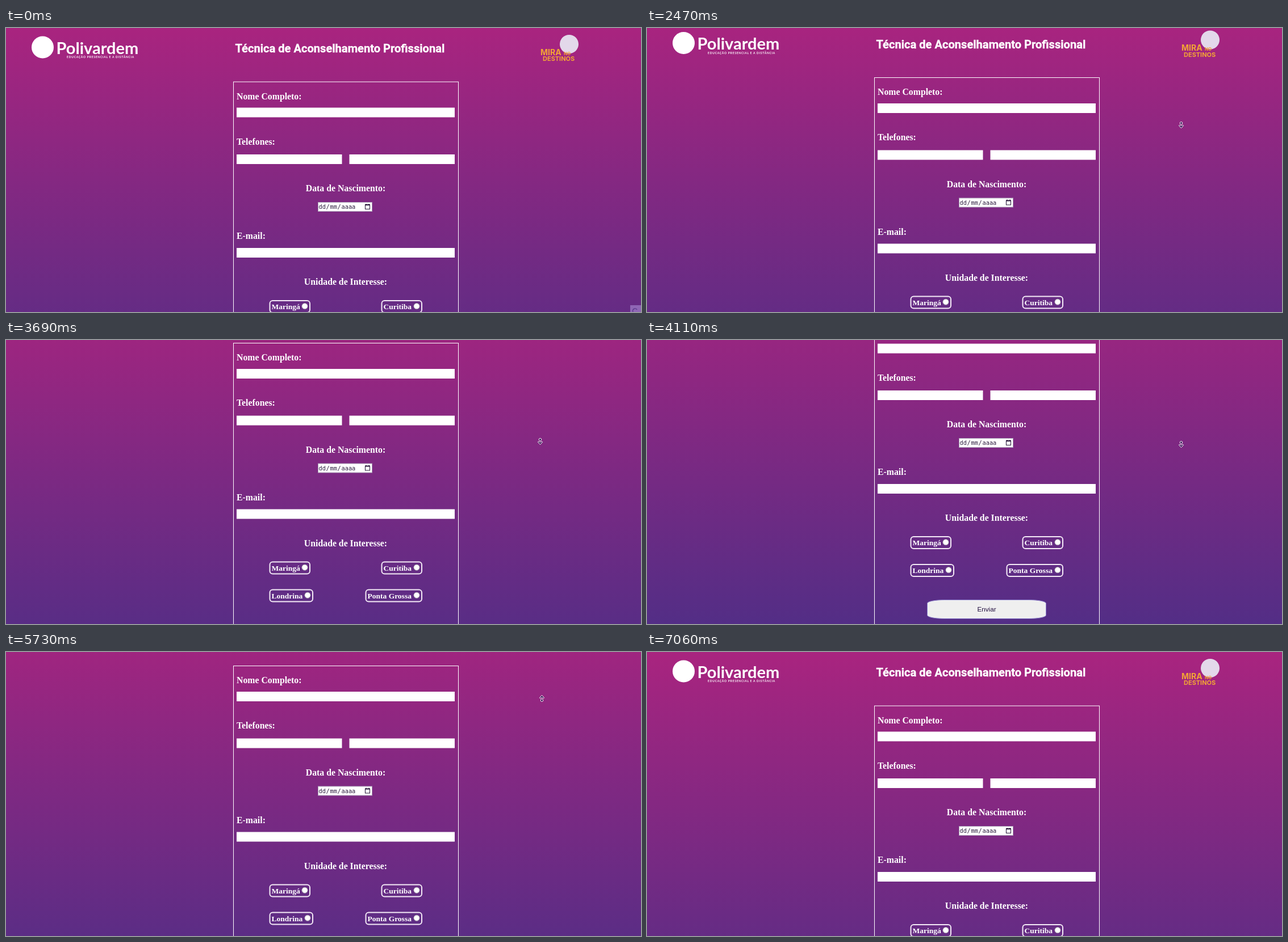
An HTML page that plays this animation: 1118 by 501 pixels, repeating every 7720 ms.

```html
<!DOCTYPE html>
<html lang="pt-BR">
<head>
<meta charset="utf-8">
<title>Formulário</title>
<style>
  html, body { margin: 0; width: 100%; height: 100%; overflow: hidden; background: #502e86; }
  svg { display: block; width: 1118px; height: 501px; }
  .label { font: 700 15.8px "Liberation Serif", "Times New Roman", serif; fill: #fff; }
  .city { font: 700 13.5px "Liberation Serif", "Times New Roman", serif; fill: #fff; }
  .title { font: 700 20.1px Roboto, sans-serif; fill: #fff; stroke: #fff; stroke-width: .35px; }
  .brand { font: 700 29px Lato, sans-serif; fill: #fff; }
  .tagline { font: 700 5px Lato, sans-serif; letter-spacing: .75px; fill: #fff; }
  .badge { font-family: Inter, sans-serif; font-weight: 700; fill: #f2a535; }
  .date { font: 10.3px "DejaVu Sans Mono", monospace; fill: #2b1a3d; }
  .send { font: 11.7px "Liberation Sans", Arial, sans-serif; fill: #231040; }
  .mid { text-anchor: middle; }
</style>
</head>
<body>
<svg viewBox="0 0 1118 501">
  <defs>
    <linearGradient id="sky" x1="0" y1="0" x2="0" y2="1">
      <stop offset="0" stop-color="#a9247f"/>
      <stop offset="1" stop-color="#502e86"/>
    </linearGradient>
    <path id="head" d="M-4 1.4Q-4 .4 -3 .4L0 1.4 3 .4Q4 .4 4 1.4L0 5.6Z"/>
  </defs>

  <g id="page">
    <rect width="1118" height="657" fill="url(#sky)"/>

    <circle cx="64.5" cy="34" r="19.5" fill="#fff"/>
    <text class="brand" x="88.5" y="45.5">Polivardem</text>
    <text class="tagline" x="107" y="53">EDUCAÇÃO PRESENCIAL E A DISTÂNCIA</text>
    <text class="title" x="403.5" y="43">Técnica de Aconselhamento Profissional</text>
    <circle cx="991.5" cy="28.5" r="16.5" fill="#e3d8ea"/>
    <g class="badge">
      <text x="941" y="47.5" font-size="14">MIRA</text>
      <text x="982" y="47.5" font-size="8">NO</text>
      <text x="945" y="58" font-size="11">DESTINOS</text>
    </g>

    <rect x="400.5" y="95" width="396" height="547" fill="none" stroke="#fff"/>
    <g id="form"></g>

    <rect x="549.5" y="307.5" width="95" height="16" fill="#fff" stroke="#a99bb5"/>
    <g class="date">
      <text x="550.5" y="319">dd</text><text x="563.5" y="319">/</text>
      <text x="570.5" y="319">mm</text><text x="583.5" y="319">/</text>
      <text x="590.5" y="319">aaaa</text>
    </g>
    <path d="M632.5 311.5h8v8h-8zM632 312.5h9M634 310v2M639 310v2" fill="none" stroke="#2b1a3d" stroke-width="1.1"/>

    <rect x="493.5" y="592.5" width="209" height="33" rx="30" ry="6" fill="#efefef" stroke="#8f83cf"/>
    <text class="send mid" x="598" y="613">Enviar</text>
    <text class="label" x="-10" y="656" style="fill:#170b26">Fale Conosco:</text>
  </g>

  <g id="corner">
    <rect x="1099" y="489" width="19" height="12" fill="#8f66b5"/>
    <path d="M1111 497a4 4 0 0 0-7 4" fill="none" stroke="#5b3a8c" stroke-width="1.5"/>
  </g>

  <g id="pointer">
    <path id="arrow" d="M.5 .5V13.5L3.5 10.8 5.5 15.5 7.6 14.6 5.6 10H9.8Z" fill="#fff" stroke="#111" stroke-width=".9"/>
    <g id="pan" fill="#3a1658" stroke="#fff" stroke-linejoin="round">
      <circle id="dot" r="2.2"/>
      <use id="down" href="#head"/>
      <use id="up" href="#head" transform="scale(1 -1)"/>
    </g>
  </g>
</svg>

<script>
const LOOP = 7720, MAX_SCROLL = 155;
const $ = id => document.getElementById(id);
const show = (id, on) => { $(id).style.display = on ? "" : "none"; };

const label = (y, s) => `<text class="label" x="406" y="${y}">${s}</text>`;
const heading = (y, s) => `<text class="label mid" x="598" y="${y}">${s}</text>`;
const field = (x, y, w) => `<rect x="${x}" y="${y}" width="${w}" height="17" fill="#fff"/>`;
const city = (x, y, right, s) => `
  <rect x="${x + 1}" y="${y + 1}" width="${right - x - 2}" height="21" rx="5" fill="none" stroke="#f3e9f6" stroke-width="2"/>
  <text class="city" x="${x + 4}" y="${y + 16.3}">${s}</text>
  <circle cx="${right - 10}" cy="${y + 10.7}" r="5.2" fill="#fff" stroke="#8b7a96" stroke-width=".9"/>`;

$("form").innerHTML = [
  label(125.5, "Nome Completo:"), field(406, 140.5, 384),
  label(205.5, "Telefones:"), field(406, 223, 185.5), field(604.5, 223, 185.5),
  heading(288, "Data de Nascimento:"),
  label(372, "E-mail:"), field(406, 388, 384),
  heading(453, "Unidade de Interesse:"),
  city(463.5, 480, 536, "Maringá"), city(660.5, 480, 733, "Curitiba"),
  city(463.5, 529, 541, "Londrina"), city(632.5, 529, 733, "Ponta Grossa")
].join("");

// Pointer path: key points in time
const path = [
  { t: 70, x: 1108, y: 490 },
  { t: 730, x: 951, y: 144 },
  { t: 1390, x: 946, y: 149 },
  { t: 2470, x: 940.5, y: 171 },
  { t: 3140, x: 940.5, y: 172 },
  { t: 4110, x: 940.5, y: 184 },
  { t: 4710, x: 941, y: 181 },
  { t: 5390, x: 943.5, y: 104 },
  { t: 5730, x: 943.5, y: 82 },
  { t: 6330, x: 933, y: 75 },
  { t: 7060, x: 1089, y: 498 }
];

function pointerAt(t) {
  const i = path.findIndex(p => p.t > t);
  if (i < 0) return path[path.length - 1];
  if (i === 0) return path[0];
  const a = path[i - 1], b = path[i], k = (t - a.t) / (b.t - a.t);
  return { x: a.x + (b.x - a.x) * k, y: a.y + (b.y - a.y) * k };
}

// Autoscroll gathers speed: a power curve down, a steeper one back up
function scrollAt(t) {
  const down = 43 * (Math.max(0, t - 2080) / 1060) ** 1.748;
  const up = 84 * (Math.max(0, t - 5330) / 400) ** 1.395;
  const y = Math.max(0, Math.min(MAX_SCROLL, down) - up);
  return Math.round(y * 2) / 2;
}

function draw(t) {
  const { x, y } = pointerAt(t);
  const panning = t >= 1390 && t < 6330;
  const down = y > 141, up = y < 160;

  $("page").setAttribute("transform", `translate(0 ${-scrollAt(t)})`);
  $("pointer").setAttribute("transform", `translate(${x} ${y})`);
  $("dot").setAttribute("cy", (up - down) * 3.2);
  $("down").setAttribute("y", up ? 2.6 : 0);
  $("up").setAttribute("y", down ? 2.6 : 0);
  show("down", down);
  show("up", up);
  show("corner", t < 70);
  show("pointer", t >= 70 && t < 7060);
  show("arrow", !panning);
  show("pan", panning);
}

const start = performance.now();
function tick() {
  draw((performance.now() - start) % LOOP);
  requestAnimationFrame(tick);
}
tick();
</script>
</body>
</html>
```
